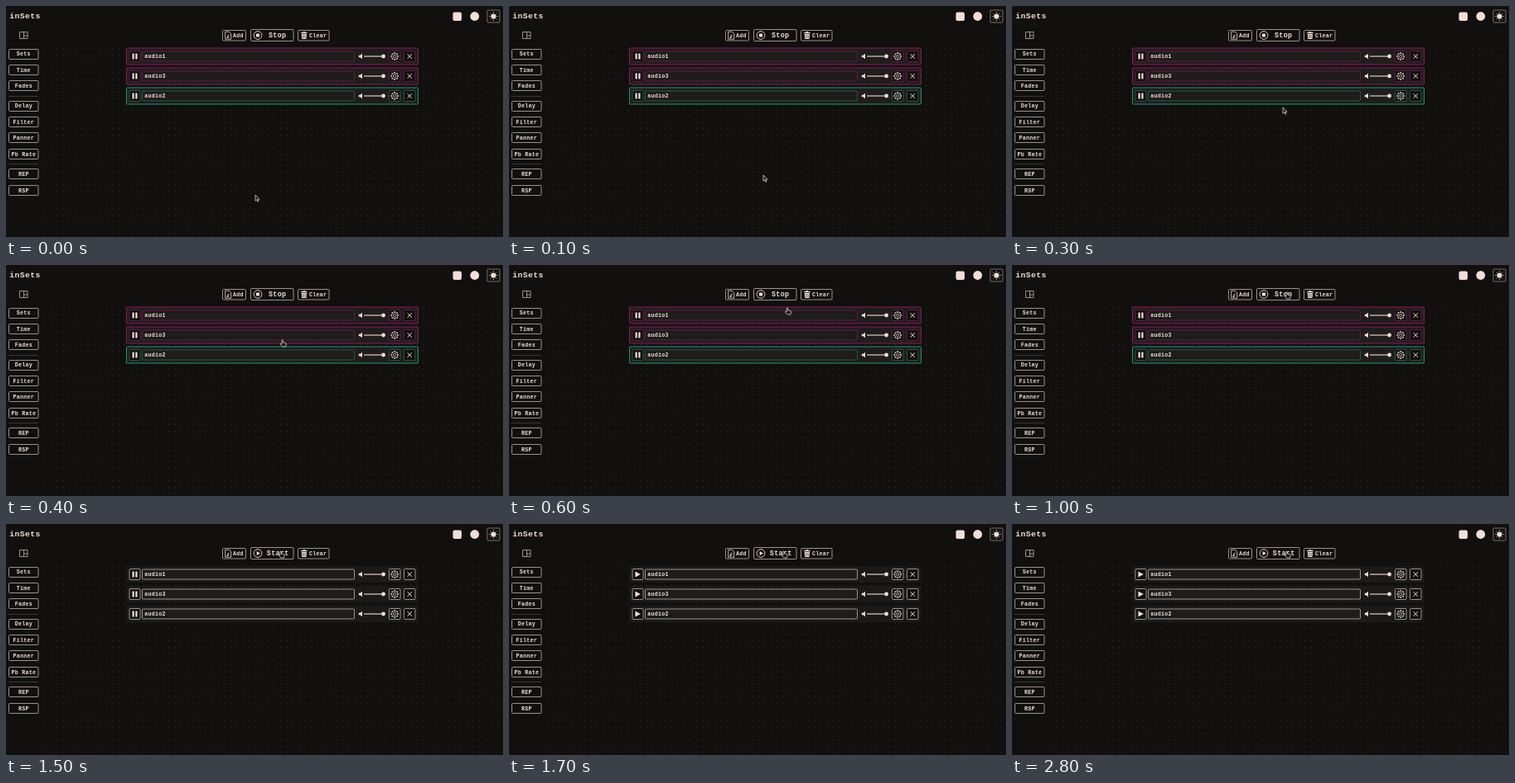
Recreate the animation shown at these times as an HTML page with a canvas. Size 600 by 280 pixels, loop 2900 ms.

```html
<!DOCTYPE html>
<html lang="en">
<head>
<meta charset="utf-8">
<title>inSets</title>
<style>
html, body { margin: 0; width: 100%; height: 100%; overflow: hidden; background: #11100e; }
canvas { display: block; width: 600px; height: 280px; }
</style>
</head>
<body>
<canvas id="stage"></canvas>
<script>
const LOOP = 2900, STEP = 100, STOP_AT = 1500, PAUSED_AT = 1700;
const CREAM = '#f0ded7', LINE = '#9b918b', BACK = '#11100e';
const canvas = document.getElementById('stage');
const scale = window.devicePixelRatio || 1;
canvas.width = 600 * scale;
canvas.height = 280 * scale;
const ctx = canvas.getContext('2d');

const sidebar = [['Sets', 58.5], ['Time', 77.7], ['Fades', 97], ['Delay', 121.5], ['Filter', 141],
  ['Panner', 160.2], ['Pb Rate', 179.7], ['REP', 204.2], ['RSP', 223.6]];
const tracks = [
  { name: 'audio1', y: 61, color: '#8a1a5d', dim: '#601a45' },
  { name: 'audio3', y: 85, color: '#8a1a5d', dim: '#601a45' },
  { name: 'audio2', y: 109, color: '#1d9471', dim: '#255647' }
];
// Pointer position at each 100 ms step
const pointer = [[301, 229], [307, 205], [318, 161], [327, 123], [333, 91], [335, 67],
  [335.3, 52], [335, 44], [333.5, 38], [332, 35], [331, 33]];

function box(x, y, w, h, stroke, fill, radius = 1, width = 1) {
  ctx.beginPath();
  ctx.roundRect(x, y, w, h, radius);
  if (fill) { ctx.fillStyle = fill; ctx.fill(); }
  if (stroke) { ctx.strokeStyle = stroke; ctx.lineWidth = width; ctx.stroke(); }
}

// Small letters with wide tracking, like a typewriter face
function text(label, x, y, size = 6.6, align = 'left') {
  ctx.font = `bold ${size}px "Liberation Mono", monospace`;
  ctx.letterSpacing = `${size * 0.045}px`;
  ctx.textAlign = align;
  ctx.fillStyle = CREAM;
  ctx.fillText(label, x, y);
}

function line(x1, y1, x2, y2, color = CREAM, width = 1) {
  ctx.beginPath();
  ctx.moveTo(x1, y1);
  ctx.lineTo(x2, y2);
  ctx.strokeStyle = color;
  ctx.lineWidth = width;
  ctx.stroke();
}

function circle(x, y, r, fill, width = 0.9) {
  ctx.beginPath();
  ctx.arc(x, y, r, 0, Math.PI * 2);
  if (fill) { ctx.fillStyle = CREAM; ctx.fill(); }
  else { ctx.strokeStyle = CREAM; ctx.lineWidth = width; ctx.stroke(); }
}

function shape(d, x, y, fill, stroke, width = 0.8) {
  const path = new Path2D(d);
  ctx.save();
  ctx.translate(x, y);
  if (fill) { ctx.fillStyle = fill; ctx.fill(path); }
  if (stroke) { ctx.strokeStyle = stroke; ctx.lineWidth = width; ctx.stroke(path); }
  ctx.restore();
}

function rays(x, y, count, inner, outer, width) {
  for (let i = 0; i < count; i++) {
    const a = i * Math.PI * 2 / count, c = Math.cos(a), s = Math.sin(a);
    line(x + c * inner, y + s * inner, x + c * outer, y + s * outer, CREAM, width);
  }
}

function drawHeader() {
  text('inSets', 4.3, 15, 9.7);
  box(539.5, 7.5, 10.5, 10.5, null, CREAM, 2);
  circle(565.8, 12.5, 5.4, true);
  box(581, 5, 15, 15, '#77706b');
  circle(588.5, 12.5, 3.1, true);
  rays(588.5, 12.5, 8, 4, 5.4, 0.8);
}

function drawSidebar() {
  box(16.5, 31.5, 9.5, 8, LINE, null, 0);
  line(21.5, 31.5, 21.5, 39.5, LINE);
  line(21.5, 36, 26, 36, LINE);
  for (const [label, y] of sidebar) {
    box(3.5, Math.round(y - 6) - 0.5, 35.5, 12, LINE);
    text(label, 21.3, y + 1.9, 6.6, 'center');
  }
  line(3, 109.5, 39, 109.5, '#393531');
  line(3, 191.5, 39, 191.5, '#393531');
}

function drawToolbar(playing) {
  box(261.5, 29.5, 28, 12.5, LINE);
  shape('M0 0H4.5L7 2.5V9H0ZM3.5 7V4L5 4.5', 264.7, 31.2, null, CREAM);
  circle(267.5, 38, 1, true);
  text('Add', 274, 38);
  box(295.5, 28.5, 51.5, 14, LINE);
  circle(304, 35.5, 4.9);
  if (playing) box(302, 33.5, 4, 4, null, CREAM, 0.4);
  else shape('M0 0L4.2 2.6L0 5.2Z', 302.7, 32.9, CREAM);
  text(playing ? 'Stop' : 'Start', playing ? 317 : 314.8, 38.3, 8.3);
  box(352.5, 29.5, 37.5, 12.5, LINE);
  shape('M0 1H2.2L2.8 0H4.6L5.2 1H7.4V2.2H0ZM.6 3H6.8L6.3 9H1.1Z', 356.2, 31, CREAM);
  for (const x of [358.5, 359.9, 361.3]) line(x, 35, x, 39, BACK, 0.45);
  text('Clear', 366, 38);
}

function drawTrack({ name, y, color, dim }, playing, paused) {
  const edge = playing ? dim : LINE;
  box(145.5, y - 10, 352, 20, playing ? color : null, playing ? '#201d1d' : '#1b1a18');
  box(149, y - 6.5, 13, 13, edge, BACK);
  if (paused) shape('M0 0L6.4 3.6L0 7.2Z', 152.4, y - 3.6, CREAM);
  else for (const x of [152.5, 156.3]) box(x, y - 3.5, 2.2, 7, null, CREAM, 0.3);
  box(164.5, y - 6, 256, 12, edge, '#1e1d1b');
  text(name, 167.2, y + 1.9);
  shape('M0 -1.3H1.7L4.2 -3.2V3.2L1.7 1.3H0Z', 425.8, y, CREAM);
  line(432, y, 456, y, CREAM, 1.1);
  circle(455.6, y, 2.4, true);
  box(462.5, y - 6.5, 13.5, 13, edge, BACK);
  rays(469.2, y, 8, 3.8, 4.9, 1.3);
  circle(469.2, y, 3.7, false, 0.7);
  circle(469.2, y, 1.6, false, 0.7);
  box(480.5, y - 6.5, 13.5, 13, edge, BACK);
  line(484.6, y - 2.7, 490, y + 2.7);
  line(490, y - 2.7, 484.6, y + 2.7);
}

function drawPointer(time) {
  const step = Math.min(Math.floor(time / STEP), pointer.length - 1);
  const [x, y] = pointer[step];
  if (y > 119) shape('M0 0V7.2L1.7 5.7L2.8 8.2L4 7.6L2.9 5.3H5Z', x, y, '#151515', '#eee', 0.7);
  else shape('M0 0Q1 -.5 1.5 .4V3L4.7 3.7Q5.4 4 5.2 5L4.6 8H.9L-1.8 5.1Q-1.8 4 -.7 4.3L0 4.8Z',
    x, y, '#151515', '#eee', 0.7);
}

function drawDots() {
  ctx.fillStyle = '#383532';
  for (let y = 51; y < 280; y += 7.5) {
    for (let x = 46; x < 600; x += 7.5) ctx.fillRect(x, y, 1, 1);
  }
}

function draw() {
  const time = performance.now() % LOOP;
  const playing = time < STOP_AT, paused = time >= PAUSED_AT;
  ctx.setTransform(scale, 0, 0, scale, 0, 0);
  ctx.fillStyle = BACK;
  ctx.fillRect(0, 0, 600, 280);
  drawDots();
  drawHeader();
  drawSidebar();
  drawToolbar(playing);
  for (const track of tracks) drawTrack(track, playing, paused);
  drawPointer(time);
  requestAnimationFrame(draw);
}
draw();
</script>
</body>
</html>
```
